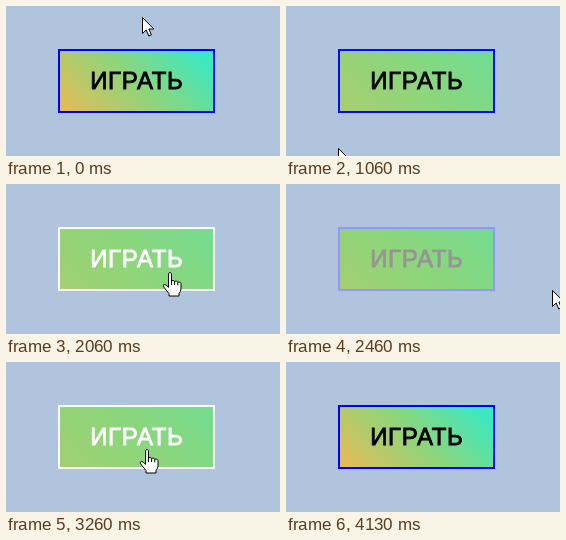
An HTML page for the animation above (4330 ms loop, 274 by 150 pixels).

```html
<!DOCTYPE html>
<html lang="ru">
<head>
<meta charset="utf-8">
<title>Кнопка</title>
<style>
html, body { margin: 0; width: 100%; height: 100%; overflow: hidden; background: #b0c4de; }
#stage { position: absolute; left: 0; top: 0; width: 274px; height: 150px; overflow: hidden; }
#play {
  position: absolute; left: 52px; top: 43px; width: 157px; height: 64px;
  box-sizing: border-box; border: 2px solid #00f;
  background: linear-gradient(45deg, #e8ba54, #8cd67c 50%, #3ce8c0 92%) center / 100% 100% no-repeat;
  font: 24px/60px "Liberation Sans", Arial, sans-serif;
  letter-spacing: .7px; text-indent: .7px;
  text-align: center; white-space: nowrap;
  -webkit-text-stroke: .8px currentColor;
}
svg { position: absolute; left: 0; top: 0; overflow: visible; }
svg path { fill: #fff; stroke: #000; stroke-linejoin: round; }
</style>
</head>
<body>
<div id="stage">
  <div id="play">ИГРАТЬ</div>
  <svg id="cursor" width="24" height="28">
    <path id="arrow" d="M.5 .5V16.5L4.2 13L6.8 19L9.4 17.9L6.9 12H11.8Z"/>
    <g id="hand">
      <path d="M-1.5 1.5Q0 -.7 1.5 1.5V9Q3 7.5 4.6 9.4Q6.4 8.2 7.8 10.2Q10 9.2 11 11.4V17Q10.8 19.5 9 21.5V24H-1V21.6L-6.4 14.8Q-7.4 12.6 -5.4 12.4Q-4 12.5 -1.5 15.3Z"/>
      <path d="M1.5 9V13M4.6 9.6V13M7.8 10.4V13.4" style="fill:none"/>
    </g>
  </svg>
</div>
<script>
const LOOP = 4330, LAST = 4130, FPS = 15;
const FADE = 400, ZOOM_DELAY = 300, ZOOM_OUT = 300, HIDE = 3460;
// turning points of the cursor: time, x, y
const turns = [
  [0, 136, 11], [440, 112, 82], [1075, 52, 142], [1520, 93, 86],
  [2225, 176, 88], [2560, 290, 111], [3130, 142, 78], [3520, 138, 113]
];
const $ = id => document.getElementById(id);
const play = $("play"), cursor = $("cursor"), arrow = $("arrow"), hand = $("hand");

const clamp = x => Math.min(1, Math.max(0, x));
const smooth = x => x * x * (3 - 2 * x);
const ease = x => smooth(Math.pow(clamp(x), .65));

function tipAt(t) {
  let i = 1;
  while (i < turns.length - 1 && turns[i][0] < t) i++;
  const [t0, x0, y0] = turns[i - 1], [t1, x1, y1] = turns[i];
  const k = smooth(clamp((t - t0) / (t1 - t0)));
  return [x0 + (x1 - x0) * k, y0 + (y1 - y0) * k];
}

function isOver(t) {
  const [x, y] = tipAt(t);
  return x >= 52 && x < 209 && y >= 43 && y < 107;
}

// times at which the cursor enters and leaves the button
const hovers = [];
for (let t = 1; t < LOOP; t++) {
  if (isOver(t) === isOver(t - 1)) continue;
  if (isOver(t)) hovers.push([t, LOOP]);
  else hovers[hovers.length - 1][1] = t;
}

// 0 at rest, 1 fully hovered
function level(t, delay, out) {
  return Math.max(...hovers.map(([a, b]) =>
    ease((t - a) / FADE) * (1 - ease((t - b - delay) / out))));
}

function draw(t) {
  const v = Math.round(255 * level(t, 0, FADE));
  const size = 100 * Math.pow(4, level(t, ZOOM_DELAY, ZOOM_OUT));
  play.style.color = `rgb(${v},${v},${v})`;
  play.style.borderColor = `rgb(${v},${v},255)`;
  play.style.backgroundSize = `${size}% ${size}%`;

  const over = isOver(t);
  const [x, y] = tipAt(t).map(Math.round);
  arrow.style.display = over ? "none" : "";
  hand.style.display = over ? "" : "none";
  cursor.style.display = t < HIDE ? "" : "none";
  cursor.style.transform = `translate(${x}px, ${y}px)`;
}

const start = performance.now();
function tick() {
  const t = (performance.now() - start) % LOOP;
  // step starts are rounded down to 10 ms, hence the small lead
  const step = Math.floor((t + 7) * FPS / 1000);
  draw(Math.min(LAST, Math.floor(step * 100 / FPS) * 10));
  requestAnimationFrame(tick);
}
tick();
</script>
</body>
</html>
```
